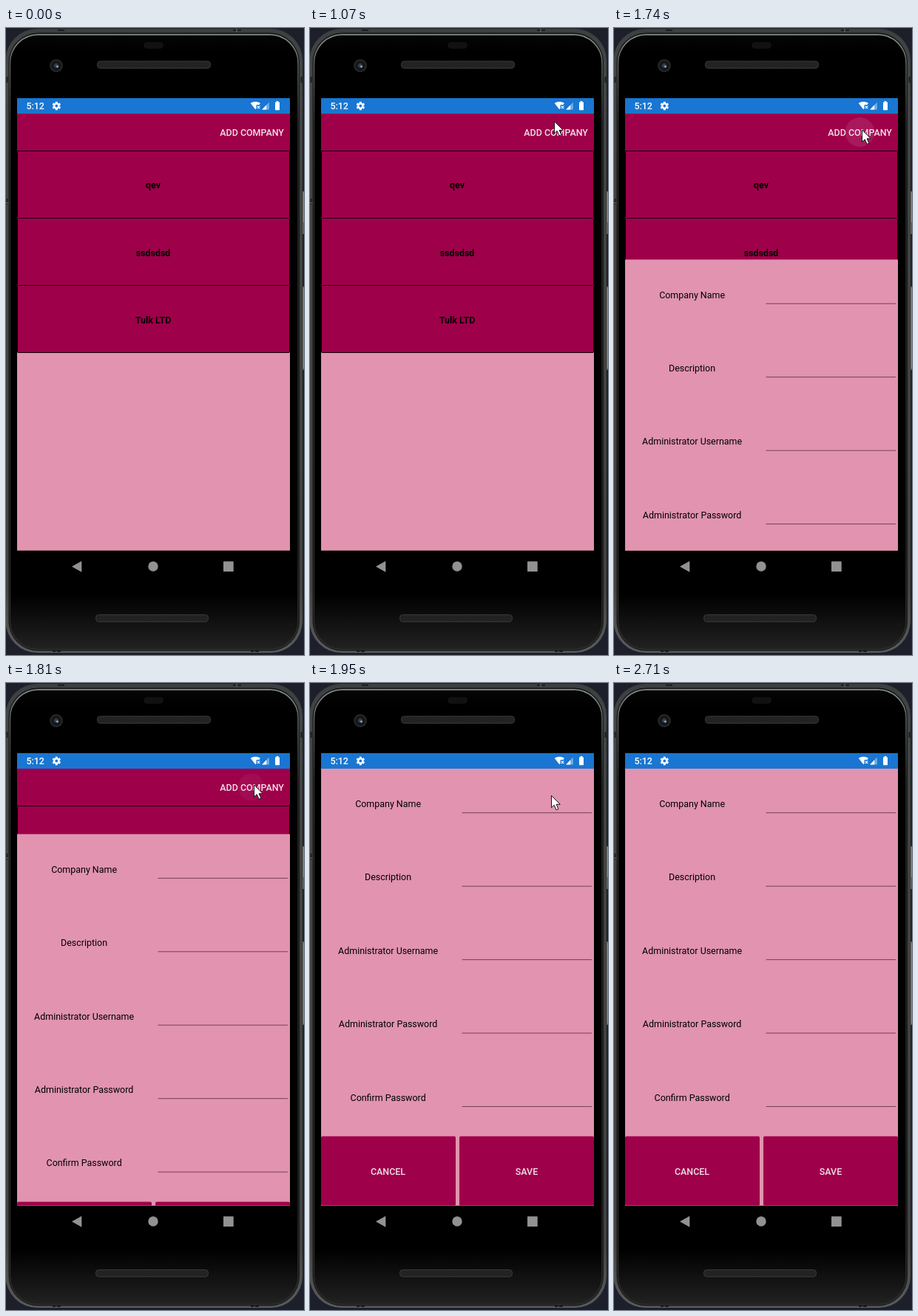
These frames come from a looping animation (403 px wide and 849 px high, 3.04 s). An HTML page:

```html
<!DOCTYPE html>
<html lang="en">
<head>
<meta charset="utf-8">
<title>Add company</title>
<style>
html, body { margin: 0; width: 100%; height: 100%; overflow: hidden; background: #1d202a; }
svg { display: block; width: 100vw; height: 100vh; }
text { font: 400 12.45px Roboto, sans-serif; text-anchor: middle; }
.b { font-weight: 700; }
.m { font-weight: 500; fill: #f0e0e8; }
</style>
</head>
<body>
<svg viewBox="0 0 403 849" preserveAspectRatio="none">
  <defs>
    <linearGradient id="rim" x2="0" y2="1">
      <stop offset="0" stop-color="#3c3f3f"/><stop offset=".06" stop-color="#434645"/>
      <stop offset=".2" stop-color="#424341"/><stop offset=".9" stop-color="#424341"/>
      <stop offset="1" stop-color="#5a5c5c"/>
    </linearGradient>
    <linearGradient id="edge" x2="0" y2="1">
      <stop offset="0" stop-color="#8b9392"/><stop offset=".05" stop-color="#565b5a"/>
      <stop offset=".15" stop-color="#262727"/><stop offset=".85" stop-color="#222"/>
      <stop offset="1" stop-color="#2d2d2d"/>
    </linearGradient>
    <linearGradient id="glass" x2="0" y2="1">
      <stop offset="0" stop-color="#050505"/><stop offset=".03" stop-color="#000"/>
      <stop offset=".91" stop-color="#000"/><stop offset="1" stop-color="#222"/>
    </linearGradient>
    <radialGradient id="lens">
      <stop offset="0" stop-color="#4f5c68"/><stop offset=".35" stop-color="#20272e"/>
      <stop offset=".6" stop-color="#0c0e10"/><stop offset=".8" stop-color="#28292b"/>
      <stop offset="1" stop-color="#1d1e1f"/>
    </radialGradient>
    <pattern id="mesh" width="3" height="3" patternUnits="userSpaceOnUse">
      <rect width="3" height="3" fill="#272727"/><path d="M0 3L3 0" stroke="#191919"/>
    </pattern>
    <clipPath id="page"><rect x="15" y="116" width="369" height="591.6"/></clipPath>
    <clipPath id="bar"><rect x="15" y="119" width="369" height="47"/></clipPath>
  </defs>

  <rect width="403" height="849" fill="#1d202a"/>
  <g fill="#5c5d5c">
    <rect x="399" y="221" width="4" height="58"/>
    <rect x="399" y="350" width="4" height="113"/>
  </g>
  <path d="M402.5 222v41M402.5 352v109" stroke="#8b8c8a"/>
  <rect x="-.5" y="1" width="401.5" height="845" rx="43" fill="url(#rim)"/>
  <path d="M70 3h9M307 3h11M63 844h11M331 844h11M1.5 66v8M1.5 231v8M399.5 66v8" stroke="#1c1d1d" stroke-width="2"/>
  <path d="M312 1v4M68 842v4M336 842v4M0 237h4" stroke="#777a78"/>
  <rect x="3.5" y="6.5" width="393.5" height="837" rx="40" fill="#161717"/>
  <rect x="5.5" y="9" width="389.5" height="832.5" rx="38" fill="url(#glass)" stroke="url(#edge)" stroke-width="1.6"/>
  <path d="M44 9.5H357" stroke="#949b9a" stroke-opacity=".5"/>

  <rect x="186" y="19" width="27" height="9" rx="4.5" fill="#111"/>
  <circle cx="68" cy="51" r="9" fill="url(#lens)"/>
  <circle cx="69.5" cy="52.3" r="1.2" fill="#a9bccb"/>
  <g fill="url(#mesh)" stroke="#3a3a3a">
    <rect x="123.5" y="45" width="153" height="9.5" rx="4"/>
    <rect x="121.5" y="794.5" width="152" height="9.5" rx="4"/>
  </g>
  <g fill="#929292">
    <path d="M89 729.3L102.3 721.8V736.8Z"/>
    <circle cx="199" cy="729" r="6.7"/>
    <rect x="294" y="722.3" width="13.7" height="13.7" rx=".5"/>
  </g>

  <rect x="15" y="95" width="369" height="21" fill="#1976d2"/>
  <text class="m" x="39.7" y="110" style="fill:#fff">5:12</text>
  <g fill="#fff">
    <g id="gear" transform="translate(68.3 105.5)"></g>
    <path d="M330.7 101.7Q337.3 97.7 344 101.7L342.3 104H338.5V108.8L337.3 110.2Z"/>
    <path d="M339.8 105.3l3.5 3.8m0-3.8l-3.5 3.8" stroke="#fff" stroke-width="1.1"/>
    <path d="M346.2 110.5L355.8 100.5V110.5Z" opacity=".4"/>
    <path d="M346.2 110.5L352.2 104.2V110.5Z"/>
    <path d="M364 100.5h1.6V99h2.8v1.5h1.6V110.5q0 .8-.8 .8h-4.4q-.8 0-.8-.8Z"/>
  </g>

  <rect x="15" y="116" width="369" height="591.6" fill="#e193af"/>
  <rect x="15" y="116" width="369" height="51" fill="#9f004a"/>
  <circle id="ripple" cy="141" fill="#fff" clip-path="url(#bar)"/>
  <text class="m" x="332.6" y="146">ADD COMPANY</text>
  <path d="M15 166.5H384" stroke="#3d001c"/>
  <g id="rows"></g>

  <g clip-path="url(#page)"><g id="form"></g></g>

  <path id="cursor" d="M0 0V16.3L3.7 12.8L6.6 19.3L9.4 18.1L6.6 11.8H11.8Z" fill="#fff" stroke="#111" stroke-width="1" stroke-linejoin="round"/>
</svg>
<script>
const $ = id => document.getElementById(id);
const LOOP = 3040;

// Moments at which the screen refreshes
const ticks = [0];
const addTicks = (from, n, gap = 70) => {
  for (let i = 0; i < n; i++) ticks.push(from + i * gap);
};
addTicks(120, 6);
addTicks(670, 5);
addTicks(1070, 2);
addTicks(1340, 1);
addTicks(1460, 6);
addTicks(1880, 7);
addTicks(2380, 1);
addTicks(2440, 3);
addTicks(2650, 1);
addTicks(2710, 1);

// Pointer route: time, x, y
const route = [
  [120, 338, 731], [330, 317, 366], [470, 295.5, 203.5], [670, 296.5, 193.5],
  [740, 299, 170], [880, 317, 95.5], [1140, 335.5, 138], [1880, 335.5, 138],
  [1950, 326.5, 152.5], [2380, 348.5, 671.5], [2650, 372, 836]
];

const lerp = (a, b, k) => a + (b - a) * k;
const clamp = v => Math.min(1, Math.max(0, v));
const span = (t, a, b) => clamp((t - a) / (b - a));

function pointerAt(t) {
  const i = route.findIndex((p, n) => n && t <= p[0]);
  const [a, b] = [route[i - 1], route[i]];
  const k = span(t, a[0], b[0]);
  return [lerp(a[1], b[1], k), lerp(a[2], b[2], k)];
}

function build() {
  let gear = '<path fill-rule="evenodd" d="M-4.2 0a4.2 4.2 0 1 0 8.4 0a4.2 4.2 0 1 0-8.4 0ZM-1.9 0a1.9 1.9 0 1 0 3.8 0a1.9 1.9 0 1 0-3.8 0Z"/>';
  for (let i = 0; i < 6; i++)
    gear += `<rect x="-1.5" y="-5.8" width="3" height="2.6" rx=".5" transform="rotate(${i * 60})"/>`;
  $('gear').innerHTML = gear;

  $('rows').innerHTML = ['qev', 'ssdsdsd', 'Tulk LTD'].map((name, i) => {
    const y = Math.floor(167 + i * 91.4);
    return `<rect x="15.5" y="${y - .5}" width="368" height="91" rx="1" fill="#9f004a" stroke="#0c0005"/>
      <path d="M16 ${y + 90.5}H383" stroke="#0c0005"/>
      <text class="b" x="199" y="${217.2 + i * 91.4}">${name}</text>`;
  }).join('');

  const fields = ['Company Name', 'Description', 'Administrator Username',
    'Administrator Password', 'Confirm Password'];
  const button = (x, name) =>
    `<rect x="${x}" y="613.8" width="182" height="94.2" rx="2" fill="#9f004a"/>
     <text class="m" x="${x + 91 - (x < 100 ? .5 : 0)}" y="665.5">${name}</text>`;
  $('form').innerHTML = '<rect x="15" y="116" width="369" height="592" fill="#e193af"/>' +
    fields.map((name, i) => {
      const y = 168 + i * 99.45;
      return `<text x="105.6" y="${y}">${name}</text>
        <rect x="205.5" y="${y + 7.2}" width="175.5" height="1" fill="#3d1425" opacity=".65"/>`;
    }).join('') + button(15, 'CANCEL') + button(202, 'SAVE');
}

function draw(now) {
  const t = ticks.filter(v => v <= now).pop();

  const left = 1 - span(t, 1585, 1952);
  $('form').setAttribute('transform', `translate(0 ${592 * left * left})`);

  const fade = span(t, 1600, 1870);
  const press = span(t, 1270, 1460);
  const ripple = $('ripple');
  ripple.setAttribute('cx', lerp(334, 331, fade));
  ripple.setAttribute('r', lerp(23, 17, fade) * press);
  ripple.setAttribute('opacity', t < 1340 ? 0 : .2 * (1 - fade));

  const shown = t >= 120 && t < 2710;
  $('cursor').setAttribute('visibility', shown ? 'visible' : 'hidden');
  if (shown) $('cursor').setAttribute('transform', `translate(${pointerAt(t)})`);
}

build();
const start = performance.now();
function frame() {
  draw((performance.now() - start) % LOOP);
  requestAnimationFrame(frame);
}
frame();
</script>
</body>
</html>
```
